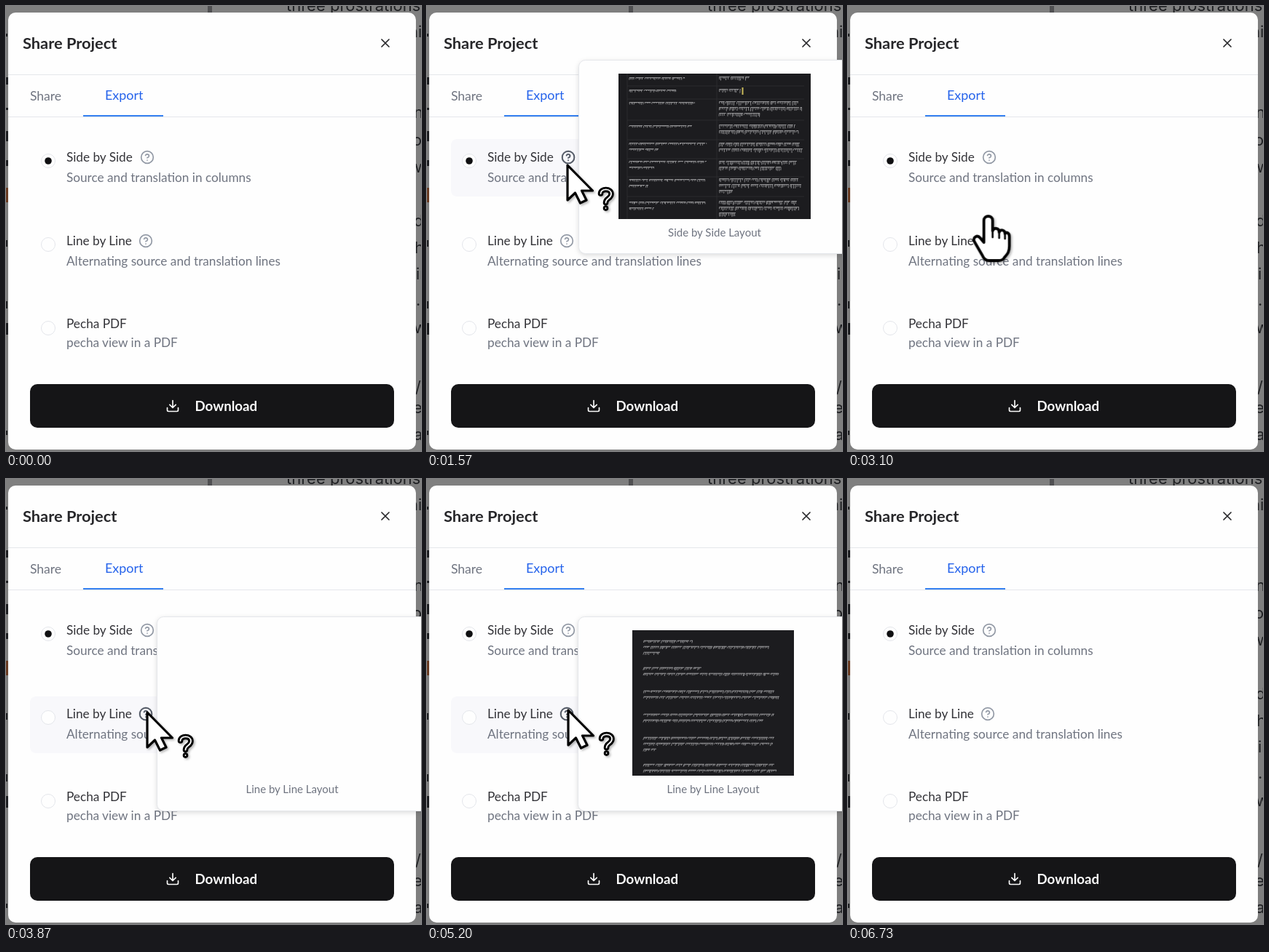
Animation, 570 px wide and 612 px high, one loop 6.76 s. Source, as an HTML page:

```html
<!DOCTYPE html>
<html lang="en">
<head>
<meta charset="utf-8">
<title>Share Project</title>
<style>
  html, body { margin: 0; width: 100%; height: 100%; overflow: hidden; background: #7f7f7f; }
  svg { display: block; width: 570px; height: 612px; font: 17.2px Lato, "Open Sans", sans-serif; }
  .page { font: 22px Inter, Roboto, sans-serif; fill: #1f2023; }
  .title { font-size: 21.8px; font-weight: 700; fill: #27272a; }
  .name { fill: #333338; }
  .note, .tab { fill: #6f7480; }
  .tab { font-size: 17.5px; }
  .active { font-size: 17.9px; fill: #2563eb; }
  .caption { font-size: 15px; fill: #6f7480; text-anchor: middle; }
  .button { font-size: 18.7px; font-weight: 700; fill: #fafafa; }
  .rule { stroke: #e5e7eb; }
  .radio { fill: #fefefe; stroke: #e3e5ea; }
  .line { fill: none; stroke-width: 2; stroke-linecap: round; stroke-linejoin: round; }
  .icon { stroke: #9299a5; }
  .dark { stroke: #4b515d; }
  .card { fill: #f8f8fb; }
  .panel { fill: #fefefe; stroke: #e5e7eb; filter: drop-shadow(0 2px 3px #0002); }
  .picture { fill: #1c1c1f; }
  .ink { fill: none; stroke: #c4c4c6; stroke-width: .65; }
  .grid { fill: none; stroke: #323236; stroke-width: .7; }

  .cursor { fill: #fff; stroke: #000; stroke-width: 3.2; stroke-linejoin: round; stroke-linecap: round;
    filter: drop-shadow(2px 2px 1.5px #0004); animation: move 6760ms ease-in-out infinite; }
  .timed { opacity: 0; animation: 6760ms step-end infinite; }

  @keyframes move {
    0%, 3.7% { transform: translate(250px, -70px); }
    8.88% { transform: translate(186px, 196px); }
    11.83% { transform: translate(192px, 216px); }
    23.22%, 34.02% { transform: translate(192px, 218px); }
    39.94%, 42.16% { transform: translate(192px, 245px); }
    48.82% { transform: translate(193px, 322px); }
    57.25% { transform: translate(193px, 320px); }
    76.92%, 87.28% { transform: translate(193px, 317px); }
    93.2%, 100% { transform: translate(-70px, 420px); }
  }
  @keyframes card1 { 0% { opacity: 0; } 8% { opacity: 1; } 44.1%, 100% { opacity: 0; } }
  @keyframes card2 { 0% { opacity: 0; } 46.6% { opacity: 1; } 90%, 100% { opacity: 0; } }
  @keyframes help1 { 0% { opacity: 0; } 9.32% { opacity: 1; } 36.24%, 100% { opacity: 0; } }
  @keyframes help2 { 0% { opacity: 0; } 48.08% { opacity: 1; } 88.76%, 100% { opacity: 0; } }
  @keyframes tip1 { 0% { opacity: 0; } 11.1% { opacity: 1; } 43.6%, 100% { opacity: 0; } }
  @keyframes tip2 { 0% { opacity: 0; } 50.3% { opacity: 1; } 88.76%, 100% { opacity: 0; } }
  @keyframes loaded { 0% { opacity: 0; } 62.9%, 100% { opacity: 1; } }
  @keyframes arrow { 0% { opacity: 1; } 36.24% { opacity: 0; } 48.08%, 100% { opacity: 1; } }
  @keyframes hand { 0% { opacity: 0; } 36.24% { opacity: 1; } 48.08%, 100% { opacity: 0; } }
  @keyframes mark {
    0% { opacity: 0; } 9.32% { opacity: 1; } 36.24% { opacity: 0; }
    48.08% { opacity: 1; } 88.76%, 100% { opacity: 0; }
  }
</style>
</head>
<body>
<svg viewBox="0 0 570 612">
  <defs>
    <g id="help" transform="scale(.833)">
      <circle cx="12" cy="12" r="10"/>
      <path d="M9.09 9a3 3 0 0 1 5.83 1c0 2-3 3-3 3M12 17h.01"/>
    </g>
  </defs>

  <rect width="570" height="612" fill="#7f7f7f"/>
  <g class="page">
    <rect x="277" width="6" height="12" fill="#505052"/>
    <text x="385" y="7">three prostrations</text>
    <text x="553" y="43">hi</text>
    <text x="560" y="154">n</text>
    <text x="558" y="192">o</text>
    <text x="561" y="229">w</text>
    <text x="560" y="303">d</text>
    <text x="561" y="340">h</text>
    <text x="563" y="376">in</text>
    <text x="563" y="412">.</text>
    <text x="560" y="450">w</text>
    <text x="562" y="532">/</text>
    <text x="559" y="560">e</text>
    <text x="560" y="597">a</text>
    <path d="M0 38h2v4h-2zM0 98h3v10h-3zM0 140h3v3h-3zM0 172h3v14h-3zM0 212h3v8h-3zM0 322h2v9h-2zM0 406h2v10h-2zM0 436h3v16h-3zM0 584h2v6h-2z"/>
    <path d="M0 250h3v20h-3z" fill="#6b3d24"/>
  </g>

  <rect x="3" y="9" width="560" height="601" rx="10" fill="#fefefe"/>
  <text class="title" x="23" y="59">Share Project</text>
  <path class="line" stroke="#27272a" style="stroke-width:1.7" d="M516 46l10 10M526 46l-10 10"/>
  <path class="rule" d="M3 94.5H563M3 152.5H563"/>
  <text class="tab" x="33" y="130">Share</text>
  <text class="active" x="136" y="129">Export</text>
  <rect x="106" y="150" width="110" height="2" fill="#3480f0"/>

  <rect class="card timed" style="animation-name:card1" x="33" y="183" width="500" height="79" rx="8"/>
  <rect class="card timed" style="animation-name:card2" x="33" y="299" width="500" height="78" rx="8"/>

  <circle class="radio" cx="58" cy="213" r="9.5"/>
  <circle cx="58" cy="213" r="4.8" fill="#0f0f11"/>
  <circle class="radio" cx="58" cy="328" r="9.5"/>
  <circle class="radio" cx="58" cy="443" r="9.5"/>
  <g class="name">
    <text x="83" y="214">Side by Side</text>
    <text x="83" y="329">Line by Line</text>
    <text x="83" y="443">Pecha PDF</text>
  </g>
  <g class="note">
    <text x="83" y="242">Source and translation in columns</text>
    <text x="83" y="357">Alternating source and translation lines</text>
    <text x="83" y="469">pecha view in a PDF</text>
  </g>
  <g class="line">
    <use class="icon" href="#help" x="184" y="198"/>
    <use class="icon" href="#help" x="182" y="313"/>
    <use class="dark timed" style="animation-name:help1" href="#help" x="184" y="198"/>
    <use class="dark timed" style="animation-name:help2" href="#help" x="182" y="313"/>
  </g>

  <rect x="33" y="520" width="500" height="60" rx="10" fill="#151517"/>
  <path class="line" stroke="#fafafa" transform="translate(219 540) scale(.833)"
    d="M21 15v4a2 2 0 0 1-2 2H5a2 2 0 0 1-2-2v-4M7 10l5 5 5-5M12 15V3"/>
  <text class="button" x="259.500" y="556.500">Download</text>

  <g class="timed" style="animation-name:tip1">
    <rect class="panel" x="208.5" y="74.5" width="372" height="266" rx="9"/>
    <rect class="picture" x="263" y="93" width="264" height="200"/>
    <path class="grid" d="M275 110H518M275 128H518M275 157H518M275 184H518M275 210H518M275 235H518M275 262H518M275 93V293M398 93V293"/>
    <path class="ink" id="columns"/>
    <rect x="432.500" y="112" width="2" height="10" fill="#c9b95a"/>
    <text class="caption" x="395" y="317">Side by Side Layout</text>
  </g>

  <g class="timed" style="animation-name:tip2">
    <rect class="panel" x="207.5" y="189.5" width="372" height="267" rx="9"/>
    <g class="timed" style="animation-name:loaded">
      <rect class="picture" x="282" y="208" width="222" height="200"/>
      <path class="ink" id="lines"/>
    </g>
    <text class="caption" x="393" y="432">Line by Line Layout</text>
  </g>

  <g class="cursor">
    <g class="timed" style="animation-name:arrow">
      <path d="M1 1V49L11.500 39L18.500 53L27 49L20.500 36H35.500Z"/>
    </g>
    <g class="timed" style="animation-name:mark" fill="none">
      <g stroke-width="7.600"><path id="mark" d="M46.500 40C46.500 32.500 61 32.500 61 40.500C61 47 53.500 46 53.500 52.500M53.500 60v.1"/></g>
      <use href="#mark" stroke="#fff" stroke-width="1.800"/>
    </g>
    <g class="timed" style="animation-name:hand" stroke-width="3.800">
      <path d="M-6 4C-6-4 6-4 6 4V18C8 13 15 14 15 20C17 15 23 17 23 22C25 19 29 21 29 26V39C29 49 25 51 22 55C20 59 17 59 14 59H1C-3 59-6 57-8 52L-19 33C-22 27-15 23-11 28L-6 34Z"/>
      <path d="M6 18V27M15 20V28M23 23V29" fill="none" stroke-width="2.600"/>
    </g>
  </g>
</svg>

<script>
  let seed = 7;
  const random = () => (seed = seed * 16807 % 2147483647) / 2147483647;

  // One line of tiny script: a broken headline with short strokes under it.
  function scribble(x, end, y, height, slant = 0) {
    let d = '';
    while (x < end) {
      const stop = Math.min(end, x + 7 + random() * 16);
      d += `M${x} ${y - height / 2}H${stop}`;
      for (; x < stop; x += 1.5 + random() * 1.3) {
        const drop = height * (0.4 + random() * 0.7);
        d += `M${x.toFixed(1)} ${y - height / 2}l${(random() - 0.5 - slant).toFixed(1)} ${drop.toFixed(1)}`;
      }
      x = stop + 1.8;
    }
    return d;
  }

  // Each row is its first baseline followed by the right end of each line.
  const draw = (rows, start, height, slant) =>
    rows.map(([y, ...ends]) => ends.map((end, i) =>
      scribble(start, end, y + i * 8, height, slant)).join('')).join('');

  const left = [[100, 354], [117, 342], [134, 368], [166, 364], [190, 384, 318],
    [215, 384, 312], [240, 382, 304], [271, 382, 312]];
  const right = [[100, 443], [117, 431], [134, 510, 515, 458], [166, 506, 510], [191, 512, 516],
    [216, 508, 486], [240, 510, 514, 420], [271, 508, 512, 424]];
  const pairs = [[224, 365, 470, 320], [261, 377, 483], [293, 477, 484], [325, 477, 462],
    [357, 477, 475, 315], [394, 477, 480]];

  const columns = draw(left, 278, 3) + draw(right, 401.5, 5);
  document.getElementById('columns').setAttribute('d', columns);
  document.getElementById('lines').setAttribute('d', draw(pairs, 298, 3.5, 0.8));
</script>
</body>
</html>
```
